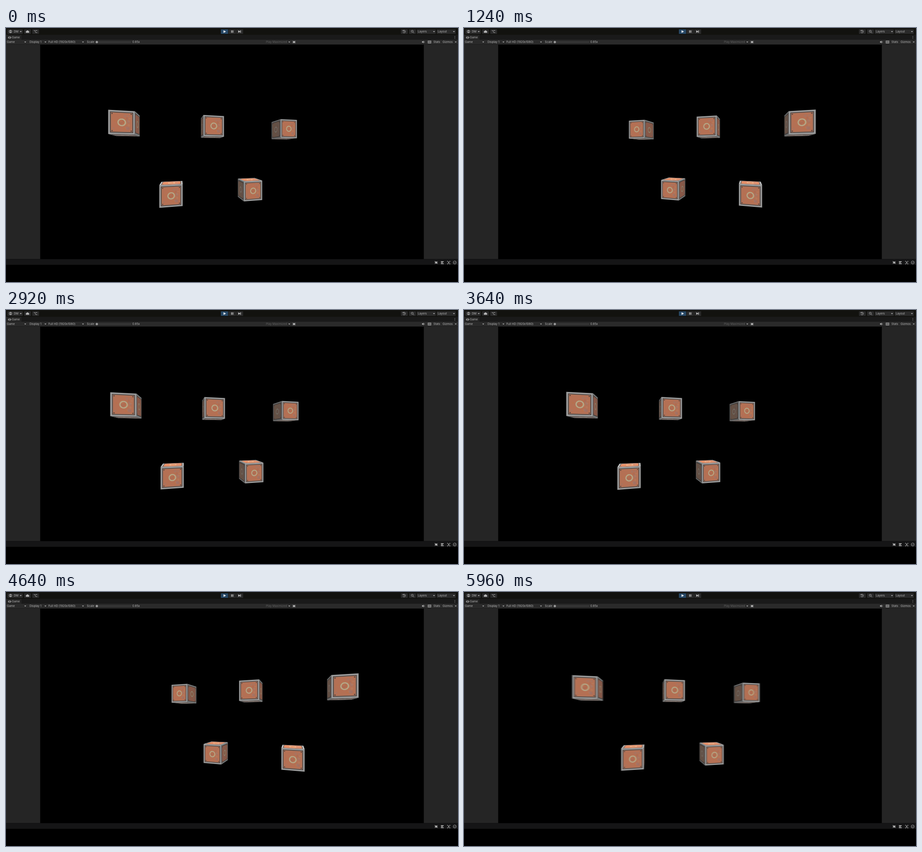
An HTML page with a canvas that plays this animation: 998x561 px, repeating every 6000 ms.

```html
<!DOCTYPE html>
<html lang="en">
<head>
<meta charset="utf-8">
<title>Swaying crates</title>
<style>
  html, body { margin: 0; width: 100%; height: 100%; overflow: hidden; background: #000; }
  canvas, svg { position: absolute; left: 0; top: 0; width: 998px; height: 561px; }
  text { font: 6.3px Inter, Roboto, sans-serif; fill: #b6b6b6; }
  .line { fill: none; stroke: #b0b0b0; stroke-width: .9; }
  .icon { fill: #b8b8b8; }
  .button { fill: #2a2a2a; }
</style>
</head>
<body>
<canvas id="view" width="998" height="561"></canvas>
<svg viewBox="0 0 998 561">
  <defs>
    <path id="arrow" class="icon" d="M-2.2-1.1H2.2L0 1.3Z"/>
    <g id="bug">
      <ellipse class="icon" rx="1.9" ry="2.6"/>
      <path class="line" d="M-3.3-2.6L3.3 2.6M-3.3 2.6L3.3-2.6M-3.4 0H3.4"/>
    </g>
  </defs>

  <rect width="998" height="15" fill="#12120f"/>
  <rect y="15" width="998" height="11" fill="#1a1a1a"/>
  <rect y="15" width="34" height="11" fill="#242424"/>
  <rect y="26" width="998" height="10.500" fill="#2a2a2a"/>
  <rect y="36.500" width="75.500" height="474" fill="#252525"/>
  <rect x="922.500" y="36.500" width="75.500" height="474" fill="#252525"/>
  <rect y="510.500" width="998" height="12.500" fill="#151516"/>

  <g class="button">
    <rect x="3" y="3" width="34" height="10" rx="1"/>
    <rect x="40" y="3" width="15" height="10" rx="1"/>
    <rect x="58" y="3" width="15" height="10" rx="1"/>
    <rect x="474.500" y="3" width="16" height="10" style="fill:#284967"/>
    <rect x="491.500" y="3" width="16" height="10"/>
    <rect x="508.500" y="3" width="15" height="10"/>
    <rect x="872" y="3" width="15" height="10" rx="1"/>
    <rect x="890" y="3" width="15" height="10" rx="1"/>
    <rect x="907" y="3" width="42" height="10" rx="1"/>
    <rect x="951" y="3" width="42" height="10" rx="1"/>
  </g>

  <!-- top bar -->
  <circle class="line" cx="10" cy="7.700" r="3"/>
  <circle class="icon" cx="10" cy="6.800" r="1.200"/>
  <path class="icon" d="M7.800 9.700Q10 7.600 12.200 9.700L10 11Z"/>
  <path class="icon" d="M45 10.500a1.800 1.800 0 0 1 0-3.500a2.700 2.700 0 0 1 5 0a1.800 1.800 0 0 1 0 3.500Z"/>
  <path class="line" d="M61.500 5.500H63.500L65.500 10H69M65 5.500H69"/>
  <path d="M480.300 5V10.800L485.800 7.900Z" fill="#f0f0f0"/>
  <path d="M497.300 5.200h1.500v5.400h-1.500zM500.200 5.200h1.500v5.400h-1.500zM513 5.200V10.600L517.200 7.900ZM517.300 5.200h1.300v5.400h-1.300z" fill="#cfcfcf"/>
  <path class="line" d="M876.500 6a3 3 0 1 1-.3 3M876.300 4.500V6.500H878.300M879.300 6V8L880.600 8.800"/>
  <circle class="line" cx="897" cy="7.200" r="2.200"/>
  <path class="line" d="M898.600 8.800L901 11.200"/>

  <!-- tab and view options -->
  <path class="line" d="M6.600 19.300H9.400a1.800 1.800 0 0 1 0 3.600H6.600a1.800 1.800 0 0 1 0-3.600Z"/>
  <circle class="icon" cx="6.500" cy="21.100" r=".9"/>
  <circle class="icon" cx="9.600" cy="21.100" r=".9"/>
  <path class="icon" d="M990.500 18h1v1h-1zM990.500 20.300h1v1h-1zM990.500 22.600h1v1h-1z"/>
  <path d="M200 31H276" stroke="#5b5b5b" stroke-width=".8"/>
  <circle cx="200.500" cy="31" r="2.600" fill="#999"/>
  <use href="#bug" x="636" y="31"/>
  <path class="icon" d="M918.500 29.800H920L922 28.200V33.600L920 32H918.500Z"/>
  <path class="line" d="M923.300 29.200Q924.600 31 923.300 32.700"/>
  <rect class="line" x="931.800" y="28.500" width="6.500" height="5"/>
  <path class="line" d="M932 30.200H938M932 31.900H938M934 28.500V33.500M936.200 28.500V33.500" style="stroke-width:.5"/>

  <g id="labels"></g>

  <!-- status bar -->
  <use href="#bug" x="949.800" y="518"/>
  <path class="line" d="M946.800 515L952.800 521"/>
  <path class="icon" d="M960.300 515.200H966.300V517H960.300ZM960.300 518H964V519.500H960.300ZM960.300 520.300H966.300V521.500H960.300Z"/>
  <path class="line" d="M960.500 515L966.500 521"/>
  <path class="line" d="M974.500 516.500V515H976M979 515H980.500V516.500M980.500 519.800V521.300H979M976 521.300H974.500V519.800"/>
  <circle class="icon" cx="977.500" cy="517.300" r="1.300"/>
  <path class="icon" d="M975.400 520.500Q977.500 517.500 979.600 520.500Z"/>
  <circle class="line" cx="990.800" cy="518" r="3.400"/>
  <path class="line" d="M989.200 518L990.400 519.200L992.600 516.800"/>
</svg>
<script>
const LOOP = 6000, STEP = 40;
const CENTER = { x: 498.5, y: 274 }, FOCAL = 410;
const PIVOT = { x: 0.22, z: 6.15 }, CUBE_Z = 3.42;
const RIGHT_TURN = 15.7, LEFT_TURN = -18.7, LAG = 225;
const FLIPS = [465, 2117, 3760, 5400];
const SHUTTER = 60, SAMPLES = 4;

const cubes = [[-4, 1.25], [-0.08, 1.25], [4, 1.25], [-2.02, -1.97], [1.94, -1.97]];

// Each face: centre normal, u axis (right), v axis (down), brightness, share of grey
const faces = [
  { n: [0, 0, -1], u: [1, 0, 0], v: [0, -1, 0], light: 1, grey: 0.05 },
  { n: [-1, 0, 0], u: [0, 0, -1], v: [0, -1, 0], light: 0.66, grey: 0.55 },
  { n: [1, 0, 0], u: [0, 0, 1], v: [0, -1, 0], light: 0.78, grey: 0.2 },
  { n: [0, 1, 0], u: [1, 0, 0], v: [0, 0, -1], light: 1.28, grey: 0.05 },
  { n: [0, -1, 0], u: [1, 0, 0], v: [0, 0, 1], light: 0.85, grey: 0.8 }
];

const labels = [
  ["DM", 17.3, 10], ["Layers", 909.3, 10], ["Layout", 953.3, 10], ["Game", 13, 23.3],
  ["Game", 2, 33.3], ["Display 1", 52, 33.3], ["Full HD (1920x1080)", 93.5, 33.3],
  ["Scale", 178.5, 33.3], ["0.85x", 279, 33.3], ["Play Maximized", 574, 33.3, "#626262"],
  ["Stats", 943.7, 33.3], ["Gizmos", 964, 33.3]
];
const arrows = [[32.5, 8], [945, 8], [989, 8], [42.5, 31], [87, 31], [170, 31], [625.5, 31], [993, 31]];
document.getElementById("labels").innerHTML =
  labels.map(([s, x, y, fill]) => `<text x="${x}" y="${y}"${fill ? ` style="fill:${fill}"` : ""}>${s}</text>`).join("") +
  arrows.map(([x, y]) => `<use href="#arrow" x="${x}" y="${y}"/>`).join("");

const view = document.getElementById("view").getContext("2d");
const layer = document.createElement("canvas");
layer.width = 998;
layer.height = 561;
const scene = layer.getContext("2d");

let seed = 7;
const random = () => (seed = (seed * 16807) % 2147483647) / 2147483647;
const blotchColors = [[150, 118, 116], [192, 108, 66], [178, 126, 98], [160, 102, 84]];
const blotches = Array.from({ length: 26 }, (_, i) => ({
  x: 0.19 + 0.62 * random(), y: 0.19 + 0.62 * random(),
  rx: 0.025 + 0.045 * random(), ry: 0.03 + 0.06 * random(),
  color: blotchColors[i % 4]
}));

const rect = inset => [[inset, inset], [1 - inset, inset], [1 - inset, 1 - inset], [inset, 1 - inset]];
const oval = (x, y, rx, ry = rx, count = 14) => Array.from({ length: count }, (_, i) => {
  const a = i / count * 2 * Math.PI;
  return [x + rx * Math.cos(a), y + ry * Math.sin(a)];
});
const ring = [oval(0.5, 0.5, 0.165), oval(0.5, 0.5, 0.115).reverse()];
const screws = [0.14, 0.86].flatMap(x => [0.14, 0.86].map(y => oval(x, y, 0.026, 0.026, 8)));

// The view eases exponentially towards a side that flips at set times.
function angleAt(time) {
  let angle = RIGHT_TURN, target = RIGHT_TURN, from = 0;
  const settle = until => target + (angle - target) * Math.exp(-(until - from) / LAG);
  for (const flip of FLIPS) {
    if (time < flip) break;
    angle = settle(flip);
    from = flip;
    target = target > 0 ? LEFT_TURN : RIGHT_TURN;
  }
  return settle(Math.max(time, from)) * Math.PI / 180;
}

function project(x, y, z, sin, cos) {
  const dx = x - PIVOT.x;
  const scale = FOCAL / (PIVOT.z + z * cos + dx * sin);
  return [CENTER.x + (PIVOT.x + dx * cos - z * sin) * scale, CENTER.y - y * scale];
}

function shade(color, { light, grey }) {
  const mean = (color[0] + color[1] + color[2]) / 3;
  return color.map(c => Math.min(255, Math.round((c + (mean - c) * grey) * light)));
}

function drawFace(cx, cy, face, sin, cos) {
  const { n, u, v } = face;
  const at = ([a, b]) => {
    const p = [cx, cy, CUBE_Z].map((c, i) => c + n[i] / 2 + u[i] * (a - 0.5) + v[i] * (b - 0.5));
    return project(...p, sin, cos);
  };
  const [o, pu, pv] = [[0, 0], [1, 0], [0, 1]].map(at);
  if ((pu[0] - o[0]) * (pv[1] - o[1]) - (pu[1] - o[1]) * (pv[0] - o[0]) <= 0) return;

  const fill = (color, paths, alpha = 1) => {
    scene.fillStyle = `rgba(${shade(color, face)},${alpha})`;
    scene.beginPath();
    for (const path of paths) {
      path.forEach((p, i) => scene[i ? "lineTo" : "moveTo"](...at(p)));
      scene.closePath();
    }
    scene.fill();
  };
  fill([154, 156, 156], [rect(0)]);
  fill([66, 58, 56], [rect(0.064)]);
  fill([150, 112, 94], [rect(0.09)]);
  fill([182, 110, 79], [rect(0.108)]);
  for (const b of blotches) fill(b.color, [oval(b.x, b.y, b.rx, b.ry, 7)], 0.42);
  fill([78, 64, 60], screws);
  fill([180, 168, 135], ring);
}

function drawScene(angle) {
  const sin = Math.sin(angle), cos = Math.cos(angle);
  scene.clearRect(0, 0, 998, 561);
  for (const [x, y] of cubes) for (const face of faces) drawFace(x, y, face, sin, cos);
}

function render(time) {
  view.globalCompositeOperation = "source-over";
  view.globalAlpha = 1;
  view.fillStyle = "#000";
  view.fillRect(0, 0, 998, 561);
  view.globalCompositeOperation = "lighter";
  view.globalAlpha = 1 / SAMPLES;
  for (let i = 0; i < SAMPLES; i++) {
    drawScene(angleAt(time + SHUTTER * (i / (SAMPLES - 1) - 0.5)));
    view.drawImage(layer, 0, 0);
  }
}

const start = performance.now();
function tick() {
  const time = (performance.now() - start) % LOOP;
  render(Math.floor(time / STEP) * STEP);
  requestAnimationFrame(tick);
}
tick();
</script>
</body>
</html>
```
